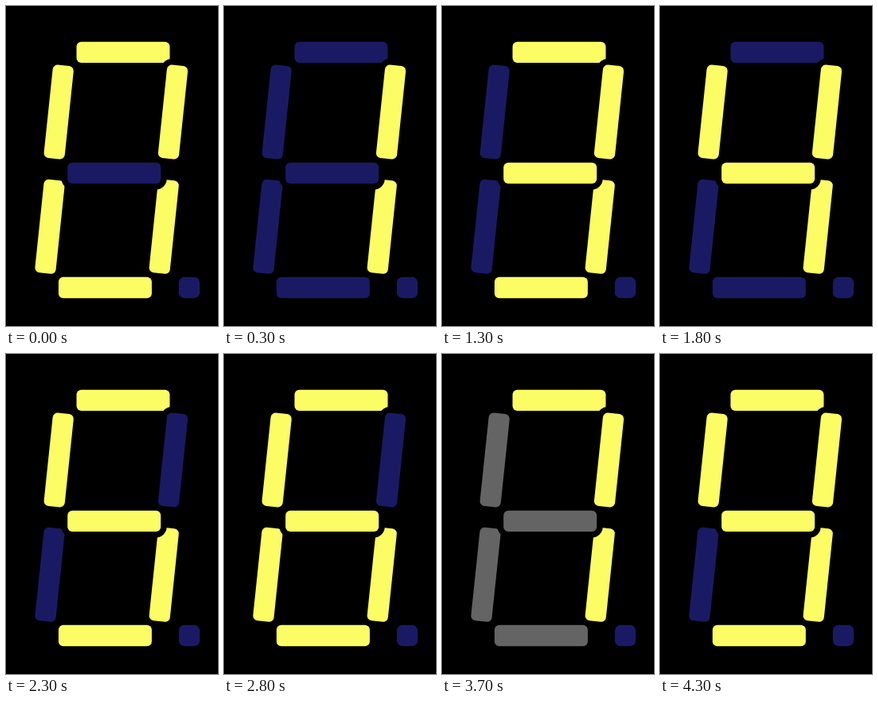
Animation, 266 px wide and 400 px high, one loop 4.7 s. Source, as an HTML page with a canvas:

```html
<!DOCTYPE html>
<html lang="en">
<head>
<meta charset="utf-8">
<title>Seven-segment counter</title>
<style>
  html, body { margin: 0; width: 100%; height: 100%; overflow: hidden; background: #000; }
  canvas { display: block; width: 266px; height: 400px; }
</style>
</head>
<body>
<canvas id="stage"></canvas>
<script>
const WIDTH = 266, HEIGHT = 400, LOOP = 4700;
const ON = '#fcfc64', OFF = '#1a1a64', CHANGING = '#646464';
const TILT = 6 * Math.PI / 180;
const GAP = 7.5;

// Centres, in painting order: each black rim trims what lies below it.
const segments = [
  { id: 'a', x: 147, y: 57.8 },
  { id: 'd', x: 124.4, y: 352 },
  { id: 'f', x: 66.2, y: 132.5, upright: true },
  { id: 'b', x: 209.5, y: 132.5, upright: true },
  { id: 'e', x: 55, y: 275.8, upright: true },
  { id: 'c', x: 198.2, y: 275.8, upright: true },
  { id: 'g', x: 135.7, y: 208.8 }
];

const digits = ['abcdef', 'bc', 'abdeg', 'abcdg', 'bcfg',
                'acdfg', 'acdefg', 'abc', 'abcdefg', 'abcdfg'];

const canvas = document.getElementById('stage');
const ctx = canvas.getContext('2d');
const scale = window.devicePixelRatio || 1;
canvas.width = WIDTH * scale;
canvas.height = HEIGHT * scale;

function bar(x, y, w, h, radius, angle, color) {
  ctx.save();
  ctx.translate(x, y);
  ctx.rotate(angle);
  ctx.beginPath();
  ctx.roundRect(-w / 2, -h / 2, w, h, radius);
  ctx.lineWidth = GAP * 2;
  ctx.strokeStyle = '#000';
  ctx.stroke();
  ctx.fillStyle = color;
  ctx.fill();
  ctx.restore();
}

// Digit n starts at 500n - 200; the 100 ms before it show the change,
// except before the last digit, which switches at once.
function stateAt(time) {
  const digit = Math.floor((time + 200) / 500);
  const next = digit + 1;
  const changing = next < 9 && (time + 200) % 500 >= 400;
  return { now: digits[digit], next: changing ? digits[next] : digits[digit] };
}

function draw(time) {
  const { now, next } = stateAt(time);
  ctx.setTransform(scale, 0, 0, scale, 0, 0);
  ctx.fillStyle = '#000';
  ctx.fillRect(0, 0, WIDTH, HEIGHT);
  for (const { id, x, y, upright } of segments) {
    const lit = now.includes(id);
    const color = lit !== next.includes(id) ? CHANGING : lit ? ON : OFF;
    if (upright) bar(x, y, 26.3, 117, 6, TILT, color);
    else bar(x, y, 117, 26.3, 6, 0, color);
  }
  bar(230, 352, 26.3, 26.3, 7, 0, OFF);
}

const start = performance.now();
function tick() {
  draw((performance.now() - start) % LOOP);
  requestAnimationFrame(tick);
}
tick();
</script>
</body>
</html>
```
